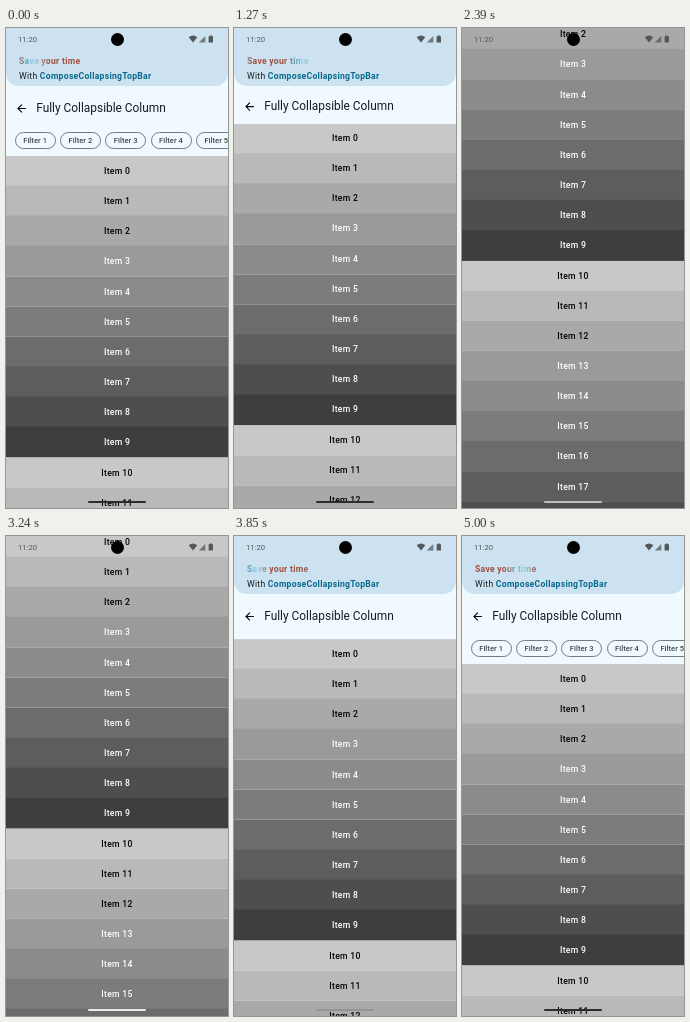
Write an HTML page that moves like this. It is 222 by 480 pixels and loops after 5030 ms.

```html
<!DOCTYPE html>
<html lang="en">
<head>
<meta charset="utf-8">
<title>Collapsing top bar</title>
<style>
  html, body { margin: 0; width: 100%; height: 100%; overflow: hidden; }
  body { position: relative; background: #f0f9fe; font: 8.64px/1 Roboto, sans-serif; color: #171c1f; white-space: nowrap; }
  #stage { position: absolute; left: 0; top: 0; width: 222px; height: 480px; overflow: hidden; }
  #stage div { position: absolute; box-sizing: border-box; }
  .row { left: 0; top: 0; width: 222px; background: #f0f9fe; }
  #filters { height: 127.5px; }
  #title { height: 97.3px; }
  #banner { height: 58px; background: #cce2f0; border-radius: 0 0 13px 13px; letter-spacing: .27px; }
  #banner b { color: #08698c; }
  #title svg { position: absolute; left: 8.6px; top: 73.5px; }
  #title .name { left: 30.2px; top: 72px; font-size: 11.9px; line-height: 16px; }
  .chip { top: 103.8px; width: 41px; height: 17.3px; border: .8px solid #707b82; border-radius: 9px;
    font-size: 7.56px; font-weight: 500; line-height: 15.6px; letter-spacing: .05px; text-align: center; color: #40484c; }
  .item { left: 0; width: 222px; height: 30.65px; line-height: 30.15px; font-weight: 500; letter-spacing: .27px; text-align: center; }
  #save { left: 13px; top: 27px; line-height: 12px; font-weight: 700; color: transparent;
    background: linear-gradient(90deg, #a0503f 24%, #8b8585 36%, #55abc9 44%, #a5d5e8 55%, #9c9b9d 65%, #a0503f 76%) 0 0 / 66px 100%;
    -webkit-background-clip: text; background-clip: text; }
  #with { left: 13px; top: 42px; line-height: 12px; }
  #clock { left: 12px; top: 6px; font-size: 7.7px; line-height: 11px; color: #53585b; }
  #hole { left: 104.5px; top: 4.5px; width: 13px; height: 13px; border-radius: 50%; background: #000; }
  #icons { position: absolute; left: 0; top: 0; }
  #pill { left: 82px; top: 472.5px; width: 58px; height: 2px; border-radius: 1px; }
</style>
</head>
<body>
<div id="stage">
  <div id="list" style="left:0;top:0"></div>
  <div id="filters" class="row"></div>
  <div id="title" class="row">
    <svg width="13" height="13" viewBox="0 0 24 24"><path d="M20 11H7.83l5.59-5.59L12 4l-8 8 8 8 1.41-1.41L7.83 13H20z"/></svg>
    <div class="name">Fully Collapsible Column</div>
  </div>
  <div id="backing" class="row" style="height:58px"></div>
  <div id="banner" class="row">
    <div id="save">Save your time</div>
    <div id="with">With <b>ComposeCollapsingTopBar</b></div>
  </div>
  <div id="clock">11:20</div>
  <svg id="icons" width="222" height="20" fill="#53585b">
    <path d="M182.7 9.2Q187 5.8 191.3 9.2L187 14.6z"/>
    <path d="M199.3 7.9V14.4H192.8z" opacity=".75"/>
    <path d="M202.6 8.3H203.8V7.5H205.8V8.3H207V14.6H202.6z"/>
  </svg>
  <div id="hole"></div>
  <div id="pill"></div>
</div>
<script>
const LOOP = 5030, ITEM_HEIGHT = 30.15;
const $ = id => document.getElementById(id);

function add(parent, className, text, style) {
  const el = document.createElement('div');
  el.className = className;
  el.textContent = text;
  Object.assign(el.style, style);
  parent.append(el);
}

for (let i = 0; i < 20; i++) {
  const shade = Math.round(200 - (i % 10) * 15.3);
  add($('list'), 'item', 'Item ' + i, {
    top: i * ITEM_HEIGHT + 'px',
    background: `rgb(${shade},${shade},${shade})`,
    color: i % 10 < 3 ? '#000' : '#fff'
  });
}
for (let i = 0; i < 5; i++) {
  add($('filters'), 'chip', 'Filter ' + (i + 1), { left: 8.6 + i * 45.3 + 'px' });
}

// [time, value] steps
const scroll = [[0, 127.5], [880, 127.5], [1270, 95.5], [1670, 58], [1940, 22], [2390, -69], [2540, -72],
  [2740, -72], [3240, -9.5], [3850, 102.5], [4300, 127.5], [LOOP, 127.5]];
const pillShade = [[0, 45], [2150, 45], [2470, 215], [2900, 215], [3200, 235], [3700, 235], [4020, 45], [LOOP, 45]];

// Monotone cubic interpolation: smooth, without overshoot
function sample(steps, t) {
  const slope = k => steps[k + 1] ? (steps[k + 1][1] - steps[k][1]) / (steps[k + 1][0] - steps[k][0]) : 0;
  const tangent = k => {
    if (k === 0) return 0;
    const a = slope(k - 1), b = slope(k);
    return a * b > 0 ? 2 * a * b / (a + b) : 0;
  };
  let k = 0;
  while (k < steps.length - 2 && t >= steps[k + 1][0]) k++;
  const [t0, v0] = steps[k], [t1, v1] = steps[k + 1];
  const d = t1 - t0, u = (t - t0) / d, w = 1 - u;
  return v0 * (1 + 2 * u) * w * w + d * tangent(k) * u * w * w
    + v1 * u * u * (3 - 2 * u) - d * tangent(k + 1) * u * u * w;
}

const moveY = (id, y) => { $(id).style.transform = `translateY(${y.toFixed(2)}px)`; };

function draw(t) {
  const top = sample(scroll, t);
  const shade = Math.round(sample(pillShade, t));
  moveY('list', top);
  moveY('filters', Math.min(0, top - 127.5));
  moveY('title', Math.min(0, top - 97.3));
  moveY('backing', Math.min(0, top - 58));
  moveY('banner', Math.min(0, top - 58));
  $('save').style.backgroundPositionX = -21 + t * .033 + 'px';
  $('pill').style.background = `rgb(${shade},${shade},${shade})`;
}

const start = performance.now();
function tick() {
  draw((performance.now() - start) % LOOP);
  requestAnimationFrame(tick);
}
tick();
</script>
</body>
</html>
```
